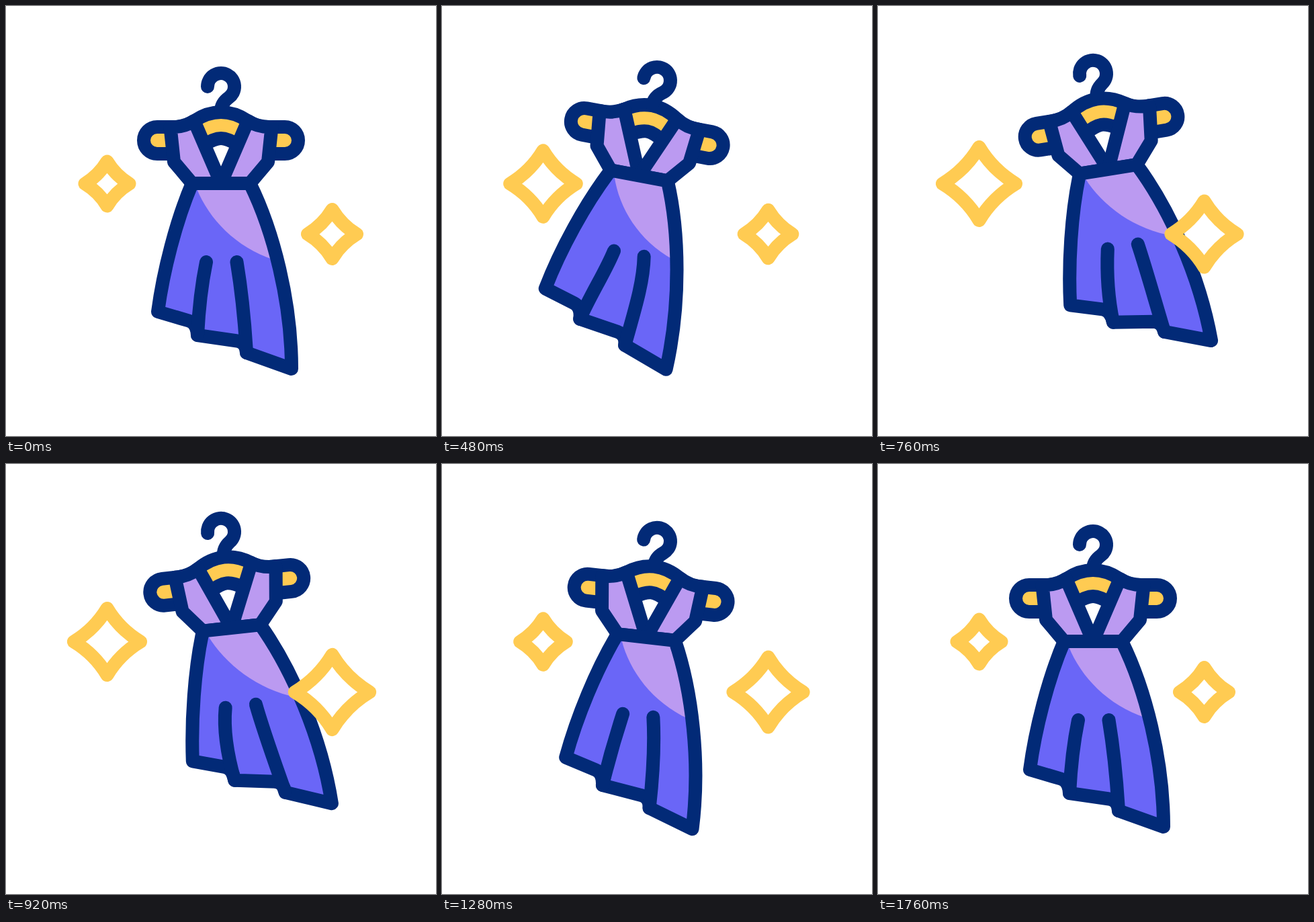
Animation of 640 by 640 pixels, one loop 1.84 s. Source, as an HTML page:

```html
<!DOCTYPE html>
<html lang="en">
<head>
<meta charset="utf-8">
<title>Dress on a hanger</title>
<style>
  html, body { margin: 0; width: 100%; height: 100%; overflow: hidden; background: #fff; }
  svg { display: block; width: 100%; height: 100%; }
  path { stroke-width: 20; stroke-linecap: round; stroke-linejoin: round; }
  .line { stroke: #022a77; fill: none; }
  .yellow { fill: #ffcb52; }
  .violet { fill: #6a66f7; }
  .lilac { fill: #bb9af1; }
  .star { fill: none; stroke: #ffcb52; }
</style>
</head>
<body>
<svg viewBox="0 0 640 640">
  <g id="dress">
    <path class="line yellow" d="M225 180H250C265 180 272 176 280 171C292 163 305 158 320 158S348 163 360 171C368 176 375 180 390 180H415A20 20 0 0 1 415 220H395C355 220 339 197 320 197S285 220 245 220H225A20 20 0 0 1 225 180Z"/>
    <path class="line" d="M300 120A20 20 0 1 1 331.500 136.400Q320 144.500 320 157"/>
    <path id="strap" class="line lilac" d="M244.500 180Q264 181 280 171L320 264H277L250 232Z"/>
    <use href="#strap" transform="translate(640 0) scale(-1 1)"/>
    <path id="skirt" class="violet"/>
    <path id="shine" class="lilac"/>
    <path id="outline" class="line"/>
    <path id="pleats" class="line"/>
  </g>
  <path id="starLeft" class="star" transform="translate(150.500 264.500)"/>
  <path id="starRight" class="star" transform="translate(485.500 339.500)"/>
</svg>
<script>
const LOOP = 1840, STEP = 40;
const el = id => document.getElementById(id);
const smooth = u => u * u * (3 - 2 * u);

// Eases through a few [ms, value] turning points, resting at each.
function ease(t, ...keys) {
  const next = keys.findIndex(key => key[0] > t);
  if (next === 0) return keys[0][1];
  if (next < 0) return keys[keys.length - 1][1];
  const [t0, v0] = keys[next - 1], [t1, v1] = keys[next];
  return v0 + (v1 - v0) * smooth((t - t0) / (t1 - t0));
}

function starPath(size) {
  const r = size - 10, c = r * .375;
  return `M${-r} 0Q${-c} ${-c} 0 ${-r}Q${c} ${-c} ${r} 0Q${c} ${c} 0 ${r}Q${-c} ${c} ${-r} 0Z`;
}

// The hem trails the swing; each point follows it by its own share.
function drawSkirt(hem, pleat) {
  const p = (x, y, share = 1) => `${(x + hem * share).toFixed(2)} ${y} `;
  const fold = (x, y) => `${(x + pleat).toFixed(2)} ${y} `;
  const body = `M277 264H363C${p(398, 335, .3)}${p(425, 440, .7)}${p(425, 540)}`
    + `L${p(358, 516)}Q${p(357, 501)}${p(344, 498.5)}`
    + `L${p(285, 490)}Q${p(284, 472)}${p(272, 468.5)}L${p(226, 455)}`
    + `C${p(234, 395, .75)}${p(253, 320, .35)}277 264Z`;
  el("skirt").setAttribute("d", body);
  el("outline").setAttribute("d", body);
  el("shine").setAttribute("d",
    `M281 264H363Q${p(391, 320, .2)}${p(404, 379, .45)}`
    + `L${p(398, 377.5, .45)}C${p(342, 359, .4)}${p(302, 317, .2)}284 272Z`);
  el("pleats").setAttribute("d",
    `M${fold(298, 381)}C${fold(291, 415)}${p(287, 450, .4)}${p(285, 490)}`
    + `M${fold(343.5, 381)}C${fold(350, 420)}${p(355, 465, .4)}${p(358, 516)}`);
}

function draw(now) {
  const t = Math.floor(now % LOOP / STEP) * STEP;
  const lift = ease(t, [160, 0], [840, -20], [1500, 0]);
  const swing = ease(t, [40, 0], [395, 13.2], [805, -9.8], [1205, 7.8], [1480, 0]);
  const hem = ease(t, [40, 0], [520, -12.5], [900, 15], [1200, -6], [1560, 0]);
  const pleat = ease(t, [40, 0], [560, 6.3], [920, 0]);
  el("dress").setAttribute("transform", `translate(0 ${lift}) rotate(${swing} 320 120)`);
  drawSkirt(hem, pleat);
  el("starLeft").setAttribute("d", starPath(ease(t, [40, 43], [700, 65], [1380, 43])));
  el("starRight").setAttribute("d",
    starPath(ease(t, [40, 46.5], [330, 43], [1040, 67.5], [1760, 46.5])));
}

const start = performance.now();
function tick() {
  draw(performance.now() - start);
  requestAnimationFrame(tick);
}
tick();
</script>
</body>
</html>
```
